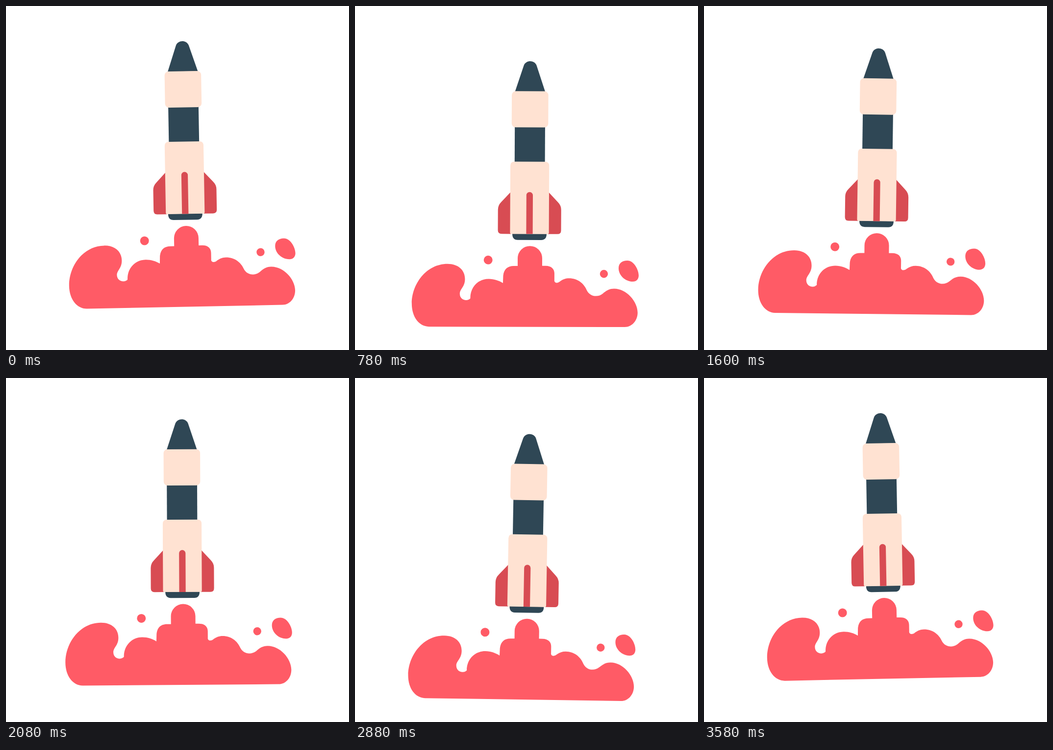
These frames come from a looping animation (700 px wide and 704 px high, 3.6 s). An HTML page:

```html
<!DOCTYPE html>
<html lang="en">
<head>
<meta charset="utf-8">
<title>Rocket launch</title>
<style>
  html, body { margin: 0; width: 100%; height: 100%; overflow: hidden; background: #fff; }
  svg { display: block; width: 100%; height: 100%; }
  .dark { fill: #2f4755; }
  .cream { fill: #ffe2d2; }
  .fin { fill: #d84c53; }
  .smoke { fill: #ff5b66; }
</style>
</head>
<body>
<svg viewBox="0 0 700 704">
  <g id="scene">
    <g transform="translate(358.1 0)">
      <path class="dark" d="M-30.7 155 L-13 101.5 C-10.5 95.5 -5 93 0 93 C5 93 10.5 95.5 13 101.5 L30.7 155 Z"/>
      <rect class="dark" x="-30.9" y="226" width="61.8" height="74"/>
      <rect class="cream" x="-37.3" y="154.4" width="74.6" height="74" rx="8"/>
      <path id="fin" class="fin" d="M-38 360 L-58 381.5 Q-64.5 388 -64.5 397 V439 Q-64.5 446.5 -57 446.5 H-38 Z"/>
      <use href="#fin" transform="scale(-1 1)"/>
      <path class="dark" d="M-35 446 H35 Q35 458.7 24 458.7 H-24 Q-35 458.7 -35 446 Z"/>
      <path class="cream" d="M-31 298.5 H31 Q39.6 298.5 39.6 307 V443.5 Q39.6 446.5 36.6 446.5 H-36.6 Q-39.6 446.5 -39.6 443.5 V307 Q-39.6 298.5 -31 298.5 Z"/>
      <path class="fin" d="M-6.6 446.5 V367.2 A6.6 6.6 0 0 1 6.6 367.2 V446.5 Z"/>
    </g>
    <g class="smoke" transform="rotate(-.15)">
      <path d="M152 637.5 C132 637 117 618 117 590 C117 551 146 509 190 509
        C211 509 225.5 521 225.5 540 C225.5 556 215 560 215 570 C215 578 221 583 228 583
        C232 583 234 581.5 236.5 579.5 C236 556 253 539.5 274 539.5 C285 539.5 295 543 303 548
        L303.5 533 C305 519 313 513 325 513 H333 V497 A25 25 0 0 1 383 497 V512.5
        H390 C402 512.5 408 519 408 528 V541 C407 548 415 549 420 544 C426 540 431 538 438 538
        C455 538 468 548 474 562 C480 575 496 578 507 569 C514 563 520 559 530 559
        C555 559 578 585 578 608 C578 625 566 637.5 552 637.5 Z"/>
      <circle cx="272.7" cy="500.8" r="9"/>
      <circle cx="509" cy="528.8" r="8.2"/>
      <path d="M557 501.5 C570 501.5 580 520 580 532 C580 540 575 544.5 568 544.5 C553 544.5 539 532 539 517 C539 507 546 501.5 557 501.5 Z"/>
    </g>
  </g>
</svg>
<script>
  const LOOP = 3600;
  const bobTurns = [0, 870, 1800, 2685, 3600];
  const tiltTurns = [0, 535, 1128, 1732, 2330, 2920, 3510];
  const scene = document.getElementById('scene');

  // Swings smoothly between -1 and 1, turning at the given times; holds after the last.
  function swing(t, turns) {
    let i = 0;
    while (i < turns.length - 2 && t >= turns[i + 1]) i++;
    const u = Math.min(1, (t - turns[i]) / (turns[i + 1] - turns[i]));
    return -Math.cos(Math.PI * (i + u));
  }

  function draw(t) {
    const y = 2.3 + 17 * swing(t, bobTurns);
    const tilt = swing(t, tiltTurns);
    scene.setAttribute('transform', `translate(0 ${y.toFixed(3)}) rotate(${tilt.toFixed(4)})`);
  }

  const start = performance.now();
  function tick() {
    draw((performance.now() - start) % LOOP);
    requestAnimationFrame(tick);
  }
  draw(0);
  requestAnimationFrame(tick);
</script>
</body>
</html>
```
